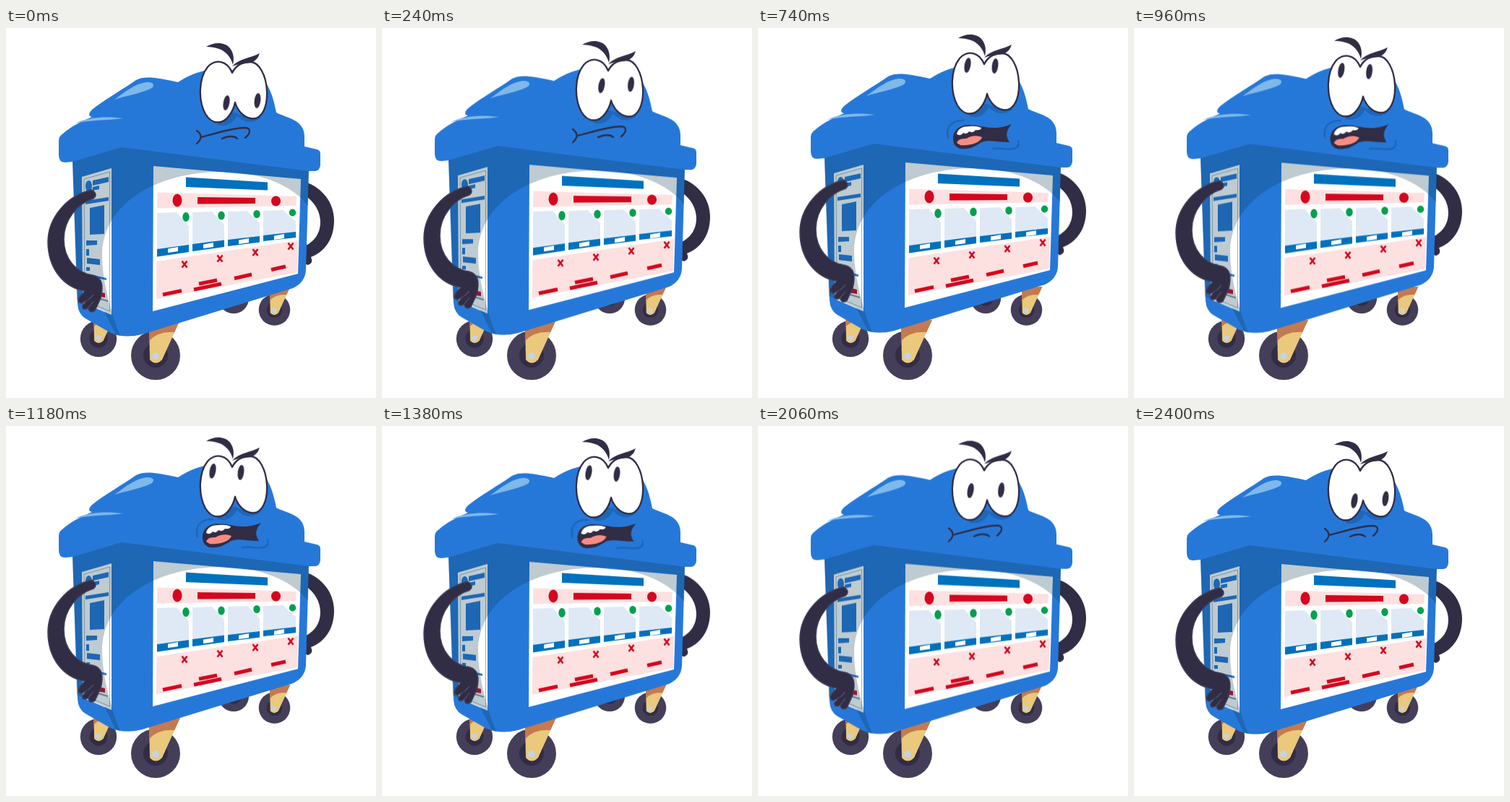
Animation, 512 px wide and 512 px high, one loop 2.42 s. Source, as an HTML page without scripts:

```html
<!DOCTYPE html>
<html lang="en">
<head>
<meta charset="utf-8">
<title>Grumpy bin</title>
<style>
  html, body { margin: 0; width: 100%; height: 100%; overflow: hidden; background: #fff; }
  svg { display: block; width: 100vw; height: 100vh; }

  .body, .arm, .face, .pupil, .shut, .open { animation: 2420ms infinite; }
  .body { --lift: -5px; animation-name: lift; }
  .arm { --lift: -8.8px; animation-name: lift; }
  .face { animation-name: face; }
  .pupil { animation-name: look-left; }
  .pupil.right { animation-name: look-right; }
  .shut { animation-name: shut; animation-timing-function: step-end; }
  .open { animation-name: open; transform-origin: 310px 152px; }

  @keyframes lift {
    0% { transform: none; animation-timing-function: cubic-bezier(.35, 0, .5, 1); }
    27% { transform: translateY(var(--lift)); animation-timing-function: cubic-bezier(.37, 0, .63, 1); }
    99%, 100% { transform: none; }
  }
  @keyframes face {
    0% { transform: none; }
    18.2% { transform: translateY(-1.2px); animation-timing-function: ease-in-out; }
    31% { transform: translateY(-7px); animation-timing-function: ease-in-out; }
    46% { transform: translateY(-1.6px); }
    57% { transform: translateY(-.8px); }
    99%, 100% { transform: none; }
  }
  @keyframes look-left {
    0% { transform: none; animation-timing-function: ease-in-out; }
    18.2% { transform: translate(-2px, -36px); }
    30.6% { transform: translate(-15px, -40px); }
    48.8% { transform: translate(-19px, -36px); }
    57% { transform: translate(-19px, -35px); animation-timing-function: ease-in; }
    73.6% { transform: translate(-20px, -25px); animation-timing-function: ease-in-out; }
    98%, 100% { transform: none; }
  }
  @keyframes look-right {
    0% { transform: none; animation-timing-function: ease-in-out; }
    18.2% { transform: translate(-6px, -34px); }
    30.6% { transform: translate(-20px, -36px); }
    48.8% { transform: translate(-23px, -31px); }
    57% { transform: translate(-23px, -30px); animation-timing-function: ease-in; }
    73.6% { transform: translate(-21px, -21px); animation-timing-function: ease-in-out; }
    98%, 100% { transform: none; }
  }
  @keyframes shut {
    0% { visibility: visible; }
    23% { visibility: hidden; }
    81%, 100% { visibility: visible; }
  }
  @keyframes open {
    0%, 22.99% { visibility: hidden; transform: translateX(-5px) scaleY(.4); }
    23% { visibility: visible; transform: translateX(-5px) scaleY(.4); }
    27% { transform: none; }
    30.6% { transform: none; }
    48.8% { transform: translateX(2px); }
    57% { transform: translateX(.5px); }
    73.6% { transform: translateX(-5px); }
    80.99% { visibility: visible; transform: translateX(-7px) scaleY(.5); }
    81%, 100% { visibility: hidden; transform: none; }
  }

  .blue { fill: #2678d8; }
  .print { fill: #0071bd; }
  .deep { fill: #1e66b8; }
  .ink { fill: #302d45; }
  .rubber { fill: #443e59; }
  .red { fill: #d3071f; }
  .pink { fill: #fde0e0; }
  .card { fill: #dfe9f5; }
  .green { fill: #00a04e; }
  .white { fill: #fff; }
  .steel { fill: #c5d3dc; }
  .brass { fill: #eac87c; }
  .rust { fill: #c47a50; }
  .line { fill: none; stroke: #302d45; stroke-width: 2.3; stroke-linecap: round; stroke-linejoin: round; }
  .crease { fill: none; stroke: #1e66b8; stroke-width: 2.5; stroke-linecap: round; }
</style>
</head>
<body>
<svg viewBox="0 0 512 512">
  <defs>
    <g id="wheel">
      <circle class="rubber" r="34"/>
      <circle class="ink" r="17"/>
    </g>
    <g id="fork">
      <path class="brass" d="M-9-48 34-50 9 5Q0 14-8 5Z"/>
      <path class="rust" d="M-9-48 34-50 26-33Q4-35-9-21Z"/>
      <circle class="steel" r="5"/>
    </g>
    <path id="cross" d="M-3.5-4.5 3.5 4.5M3.5-4.5-3.5 4.5" stroke="#d3071f" stroke-width="2.6"/>
    <path id="label" class="white" d="M-7-1.5 7-4V2L-7 4Z"/>
  </defs>

  <!-- Casters stay on the floor -->
  <use href="#wheel" transform="translate(315 374) scale(.62)"/>
  <use href="#wheel" transform="translate(128 430) scale(.74)"/>
  <use href="#fork" transform="translate(128 429) scale(.74)"/>
  <use href="#wheel" transform="translate(371.500 390) scale(.64)"/>
  <use href="#fork" transform="translate(371 391) scale(.66)"/>
  <use href="#wheel" transform="translate(207 453)"/>
  <use href="#fork" transform="translate(207 454)"/>

  <g class="body">
    <path class="arm ink" d="M414 213C438 221 454 242 454 266C454 293 440 310 422 317Q426 325 418 328L408 324V304C425 298 435 286 435 268Q434 246 414 232Z"/>

    <path class="blue" d="M92 183 160 163 419 196 415 335Q414 352 397 360L188 424Q164 430 145 422L110 402Q100 396 99 382Z"/>

    <!-- Side notice -->
    <path class="white" d="M105 206 146 194V397L106 380Z"/>
    <path d="M108 209 143.500 199V392L109 377Z" fill="none" stroke="#9db4c4"/>
    <g class="blue">
      <ellipse cx="114.500" cy="219" rx="4.500" ry="8"/>
      <path d="M120 211 142 206V213L120 218ZM120 220 129 218V223L120 225ZM110 239 142 234V239L110 244ZM116 249 136 245V285L116 286ZM111 294 126 294V300L111 301ZM111 306H115V315H111ZM112 318 130 320V328L112 326ZM111 331H116V336H111ZM112 340 139 346V349L112 343Z"/>
    </g>
    <path class="red" d="M126 364 137 367V373L126 371Z"/>
    <path d="M128 374 141 378" stroke="#8999a6" stroke-width="2"/>

    <!-- Front poster -->
    <path class="white" d="M204 191 408 209 404 340 203 392Z"/>
    <path class="print" d="M249 206.500 362 213.500V224.500L249 220Z"/>
    <path class="pink" d="M209.500 227.500 402 233 401 246 209 249.500Z"/>
    <g class="red">
      <ellipse cx="237" cy="238.500" rx="6.500" ry="9"/>
      <path d="M265 234 345 235V243L265 243.500Z"/>
      <ellipse cx="373.500" cy="239.500" rx="6.500" ry="7"/>
    </g>
    <path class="card" d="M209 256 236 255 253 274V302L209 308ZM258 255 285 254 302 272V296L258 302ZM307 254 334 253 351 270V290L307 295ZM356 253 383 252 401 268V284L356 289Z"/>
    <path class="print" d="M209 306 253 300V310L209 316.500ZM258 299 302 293.500V303L258 309ZM307 293 351 288V296.500L307 302ZM356 287 401 282V290L356 295Z"/>
    <use href="#label" x="231" y="307"/>
    <use href="#label" x="280" y="301"/>
    <use href="#label" x="329" y="295"/>
    <use href="#label" x="378" y="289"/>
    <g class="green">
      <ellipse cx="249" cy="261.500" rx="4.700" ry="6.500"/>
      <ellipse cx="298" cy="259.500" rx="4.700" ry="6"/>
      <ellipse cx="347" cy="257.500" rx="4.700" ry="5.500"/>
      <ellipse cx="396.500" cy="255.500" rx="4.700" ry="5"/>
    </g>
    <path class="pink" d="M208.500 323 404 294 403 338 208 375Z"/>
    <use href="#cross" x="247" y="327"/>
    <use href="#cross" x="296" y="319"/>
    <use href="#cross" x="345" y="310.500"/>
    <use href="#cross" x="394" y="302"/>
    <path d="M217 369 243 363.500M267 354 292 349M260 362 298 354M316 346.500 340 341M367 334.500 387 330" stroke="#d3071f" stroke-width="5"/>

    <!-- Shade around the lit oval -->
    <path d="M92 183 160 163 419 196 418 246C395 216 348 199 300 199C205 199 133 245 133 315C133 350 146 397 158 426L152 424 136 392 98 376Z" fill="#053850" opacity=".26"/>

    <!-- Lid -->
    <path class="blue" d="M73 156Q73 150 79 146C88 138 100 131 119 123L116 122Q113 119 119 113C135 100 163 84 180 72C192 66 207 68 238 75C254 65 265 61 276 59L340 58C362 68 370 95 374 117C386 124 413 126 413 150V164L430 168Q435 169 435 174V190Q434 197 428 198L419 198 160 165 92 185 82 186Q73 186 73 176Z"/>
    <path d="M150 99C165 88 179 77 194 75C205 74 207 80 200 84C185 91 165 94 150 99ZM95 132C114 123 140 122 162 125C140 128 117 127 95 132Z" fill="#7fb8ea"/>

    <g class="shut line">
      <path d="M264 142Q275 150 264 160M270 151C290 146 314 138 331 138C341 139 337 147 331 152M299 153Q313 147 320 153"/>
    </g>
    <g class="open">
      <path class="crease" d="M263 157C259 142 268 132 284 133M325 172C340 170 348 175 357 171Q362 168 360 161"/>
      <path class="ink" d="M270 160C269 150 275 141 287 139.500C302 138 312 143 325 143C336 143 343 141 351 138C343 147 342 154 348 163C332 163 319 159 309 163C299 170 291 173 281 172Q271 170 270 160Z"/>
      <path class="white" d="M275 152C276 144 284 141 292 141Q302 140 309 143Q308 147 301 146Q298 151 292 148Q289 153 284 150Q281 155 275 152Z"/>
      <path d="M275 164Q277 157 288 158C294 154 302 153 310 156C307 165 291 168 280 167Z" fill="#f98c82"/>
    </g>

    <g class="face">
      <path class="deep" d="M292 134C306 138 317 130 321 118L309 116ZM319 120C326 131 342 134 352 124L335 118Z"/>
      <path class="line white" style="fill:#fff" d="M313 62C306 45 290 42 279 54C266 70 266 101 276 119C285 134 300 134 309 121Q315 113 317 103C320 113 328 124 341 125.500C355 126 362 108 361 87C360 65 350 47 338 47C325 47 317 54 313 62Z"/>
      <g class="pupil"><ellipse class="ink" rx="4.300" ry="10.500" transform="translate(305 103.500) rotate(10)"/></g>
      <g class="pupil right"><ellipse class="ink" rx="4.300" ry="10.500" transform="translate(348 100.500) rotate(7)"/></g>
      <path class="ink" d="M277 26C286 20 302 18 310 28Q317 37 314 51C311 40 304 32 295 29Q287 26 277 26ZM313 53C323 42 338 42 351 35Q348 45 339 48C330 49 321 50 313 53Z"/>
    </g>

    <g class="arm">
      <path class="ink" stroke="#443e59" stroke-width="1.500" d="M119 224C85 231 58 262 58 296C58 333 80 359 109 364L102 372Q97 380 105 381L113 376 106 384Q105 391 112 388L114 387Q115 396 123 391L131 374C135 358 134 345 120 342C98 339 80 320 80 292C80 265 100 242 121 236Q128 230 119 224Z"/>
      <path d="M114 376 121 369M114 387 121 378" fill="none" stroke="#5a5370" stroke-width="1.200"/>
    </g>
  </g>
</svg>
</body>
</html>
```
